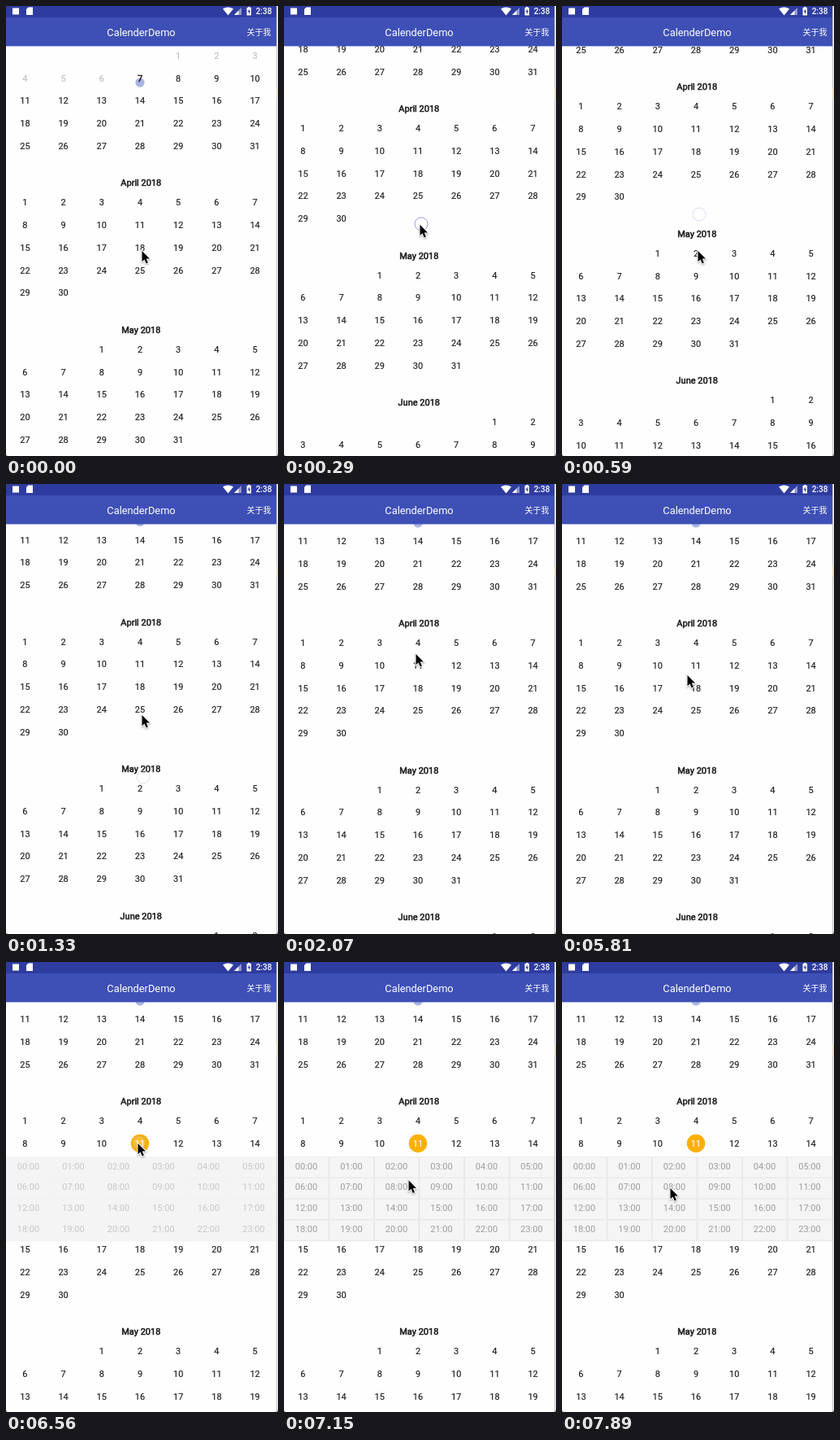
Write an HTML page with a canvas that moves like this. It is 335 px wide and 553 px high and loops after 8000 ms.

```html
<!DOCTYPE html>
<html lang="en">
<head>
<meta charset="utf-8">
<style>
html, body { margin: 0; width: 100%; height: 100%; overflow: hidden; background: #fefefe; }
canvas { display: block; }
</style>
</head>
<body>
<canvas id="stage" width="335" height="553"></canvas>
<script>
const ctx = document.getElementById('stage').getContext('2d');
const W = 333, ROW = 27.75, HOURS_H = 103, LOOP = 8000;
const SANS = 'Roboto, sans-serif', INK = '#1c1c1c';

// pointer moves: start, end, destination
const moves = [
  [0, 434, 167, 256], [434, 582, 167, 300],
  [878, 1174, 167, 360], [1174, 1322, 167, 283], [1322, 2062, 162, 208],
  [2210, 2358, 162, 219], [2950, 3246, 143, 262],
  [5800, 5808, 154, 234], [5808, 6105, 162, 222],
  [6847, 7292, 150, 283], [7292, 7887, 133, 277]
];
// touches: press, release
const touches = [[138, 434], [1026, 1174], [6253, 6402]];

const ramp = (t, from, to) => Math.min(1, Math.max(0, (t - from) / (to - from)));
const smooth = p => p * p * (3 - 2 * p);
const easeOut = p => 1 - (1 - p) ** 3;

// The screen refreshes about seven times a second
function snap(t) {
  return t < 5808 ? Math.floor((t + 10) / 148) * 148 - 10
                  : 5808 + Math.floor((t - 5808) / 148.5) * 148.5;
}

// Height of the April title: a fling up, then a shorter one back
function scroll(t) {
  return 217.3 - 118 * easeOut(ramp(t, 60, 640)) + 71.9 * easeOut(ramp(t, 930, 1470));
}

function pointerAt(t) {
  let x = 167, y = 300;
  for (const [from, to, toX, toY] of moves) {
    const p = smooth(ramp(t, from, to));
    x += (toX - x) * p;
    y += (toY - y) * p;
  }
  return [x, y];
}

function text(str, x, y, color, font = '11px ' + SANS, bold = 0) {
  ctx.font = font;
  ctx.fillStyle = ctx.strokeStyle = color;
  ctx.fillText(str, x, y);
  if (bold) {
    ctx.lineWidth = bold;
    ctx.strokeText(str, x, y);
  }
}

function rect(x, y, w, h, color) {
  ctx.fillStyle = color;
  ctx.fillRect(x, y, w, h);
}

function disc(x, y, r, color) {
  ctx.fillStyle = color;
  ctx.beginPath();
  ctx.arc(x, y, r, 0, 7);
  ctx.fill();
}

function shape(d, color) {
  ctx.fillStyle = color;
  ctx.fill(new Path2D(d));
}

function drawMonths(top, shift, selected) {
  for (let m = 0; m < 4; m++) {
    const first = new Date(2018, m + 2, 1).getDay();
    const days = new Date(2018, m + 3, 0).getDate();
    const name = ['March', 'April', 'May', 'June'][m] + ' 2018';
    const y0 = top + (m - 1) * 180.5 + (m > 1 ? shift : 0);
    text(name, 166.3, y0 + 4, INK, undefined, .55);
    for (let d = 1; d <= days; d++) {
      const cell = d - 1 + first, row = Math.floor(cell / 7);
      const x = 23.4 + cell % 7 * 47.2;
      const y = y0 + 24 + row * ROW + (m === 1 && row > 1 ? shift : 0);
      const today = m === 0 && d === 7, picked = selected && m === 1 && d === 11;
      if (today) disc(x, y + 5.5, 5.6, '#a9b5e2');
      if (picked) disc(x, y, 11.2, '#fbb000');
      const color = picked ? '#fff' : m === 0 && d < 7 ? '#bdbdbd' : INK;
      text(d, x, y + 4, color, undefined, today ? .55 : .15);
    }
  }
}

function drawHours(y, alpha) {
  const w = W / 6, h = HOURS_H / 4;
  ctx.globalAlpha = alpha;
  rect(0, y, W, HOURS_H + 1, '#e9e9e9');
  for (let i = 0; i < 24; i++) {
    const x = i % 6 * w, cy = y + Math.floor(i / 6) * h;
    rect(x + 1, cy + 1, w - 2, h - 1.5, '#f5f5f5');
    text(String(i).padStart(2, '0') + ':00', x + w / 2 - .3, cy + 15.5, '#9c9c9c');
  }
  ctx.globalAlpha = 1;
}

function drawBars() {
  rect(0, 14, W, 35.4, '#3e50b6');
  rect(0, 0, W, 14, '#2f3c9f');
  rect(8, 2.5, 8, 8, '#fff');
  shape('M27.5 1.5H33V11H25V4Z', '#fff');
  shape('M267 3.6Q273.5 -.8 280 3.6L273.5 11.5Z', '#fff');
  shape('M281 11L290 2V11Z', '#8f97cd');
  shape('M281 11L286.5 5.5V11Z', '#fff');
  shape('M298 1H300.5V2H302V11.5H296.5V2H298Z', '#fff');
  shape('M299.8 3.5L297.5 7.3H299V10L301.2 6.2H299.8Z', '#2f3c9f');
  text('2:38', 317.5, 10, '#fff', '500 10px ' + SANS);
  text('CalenderDemo', 166.5, 37, '#fff', '12.8px ' + SANS);
  text('关于我', 311.5, 36, '#fff', '10px "Noto Sans CJK SC", "Noto Sans CJK", sans-serif');
}

function drawEdges() {
  rect(W, 0, 2, 553, '#f0f0f0');
  rect(W, 0, 1, 553, '#c6c6c6');
  rect(W, 101, 2, 13, '#e3dec6');
  shape('M0 550Q0 553 3 553H0Z', '#777');
  shape('M335 549Q335 553 331 553H335Z', '#777');
}

function drawPointer(x, y) {
  ctx.save();
  ctx.translate(x + .5, y + 1);
  const arrow = new Path2D('M0 0V13.2L3 10.4L5.2 15.6L7.4 14.6L5.2 9.6H9.4Z');
  ctx.shadowColor = 'rgba(0,0,0,.35)';
  ctx.shadowBlur = 2;
  ctx.shadowOffsetY = 1;
  ctx.strokeStyle = '#fff';
  ctx.lineWidth = 2;
  ctx.stroke(arrow);
  ctx.shadowColor = 'transparent';
  ctx.fillStyle = '#000';
  ctx.fill(arrow);
  ctx.restore();
}

// The dot follows the pointer and fades where it is released
function drawTouch(t, press, release) {
  const alpha = 1 - ramp(t, release, release + 220);
  if (t < press || !alpha) return;
  const [x, y] = pointerAt(Math.min(t, release));
  disc(x + 2, y, 8, `rgba(255,255,255,${alpha * .6})`);
  ctx.strokeStyle = `rgba(150,155,225,${alpha})`;
  ctx.lineWidth = 1;
  ctx.stroke();
}

function draw(now) {
  const t = snap(now % LOOP), top = scroll(t);
  const open = smooth(ramp(t, 6253, 6550)), alpha = ramp(t, 6402, 6699);
  ctx.textAlign = 'center';
  rect(0, 0, 335, 553, '#fefefe');
  drawMonths(top, open * (HOURS_H - .3), t > 6390);
  if (alpha) drawHours(top + 68, alpha);
  drawBars();
  drawEdges();
  for (const touch of touches) drawTouch(t, ...touch);
  drawPointer(...pointerAt(t));
}

const start = performance.now();
function loop() {
  draw(performance.now() - start);
  requestAnimationFrame(loop);
}
loop();
</script>
</body>
</html>
```
